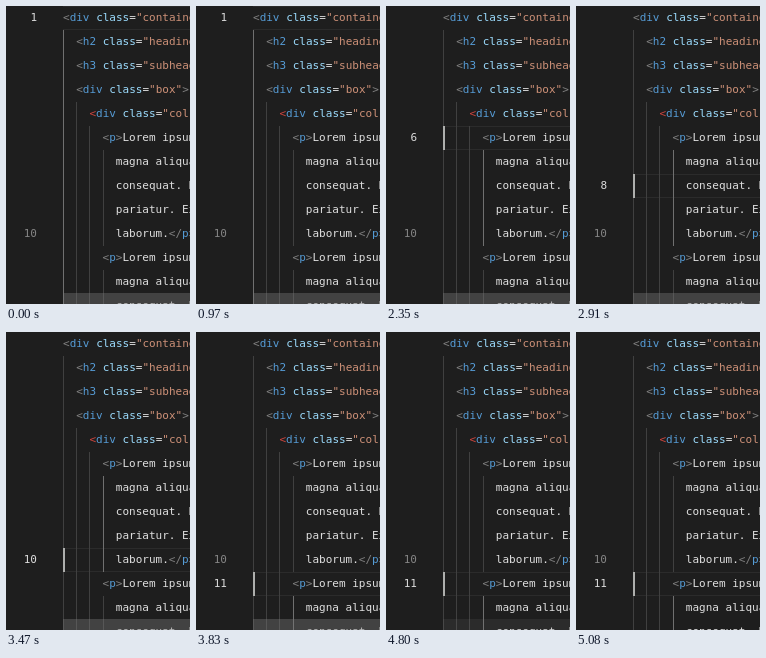
Recreate the animation shown at these times as an HTML page. Size 184 by 298 pixels, loop 5.13 s.

```html
<!DOCTYPE html>
<html lang="en">
<head>
<meta charset="utf-8">
<title>Code editor</title>
<style>
html, body { margin: 0; width: 100%; height: 100%; overflow: hidden; background: #1e1e1e; }
#editor {
  position: relative; width: 184px; height: 298px; overflow: hidden;
  background: #1e1e1e; color: #e0e0e0;
  font: 11px/24px "DejaVu Sans Mono", "Liberation Mono", monospace;
  font-variant-ligatures: none;
}
#editor div { position: absolute; box-sizing: border-box; white-space: pre; }
.number { left: 0; width: 31px; height: 24px; text-align: right; color: #858585; }
.number.active { color: #dcdcdc; }
.code { height: 24px; }
.guide { width: 1px; background: #404040; }
.guide.active { background: #707070; }
#current { left: 57px; width: 140px; height: 24px; border: 1px solid #2b2b2b; border-width: 1px 0; }
#cursor { left: 57px; width: 2px; height: 24px; background: #aeafad; }
#scrollbar { left: 57px; top: 287px; width: 127px; height: 11px; background: rgba(121, 121, 121, .4); }
.bracket { color: #808080; }
.mismatch { color: #d0453e; }
.tag { color: #569cd6; }
.attr { color: #9cdcfe; }
.string { color: #ce9178; }
</style>
</head>
<body>
<div id="editor"><div id="current"></div></div>
<script>
const LOOP = 5130, ROW = 24, LEFT = 57, INDENT = 13.2;
const editor = document.getElementById('editor');
const current = document.getElementById('current');

function add(className, top, text = '') {
  const el = document.createElement('div');
  el.className = className;
  el.style.top = top + 'px';
  el.innerHTML = text;
  return editor.appendChild(el);
}

const span = (kind, text) => `<span class="${kind}">${text}</span>`;
const open = (tag, bracket = 'bracket') => span(bracket, '&lt;') + span('tag', tag);
const close = span('bracket', '&gt;');
const element = (tag, name, bracket) =>
  open(tag, bracket) + ' ' + span('attr', 'class') + '=' + span('string', `"${name}"`) + close;
const paragraph = open('p') + close + 'Lorem ipsum dolor';

// Each entry is [indent level, markup].
const lines = [
  [0, element('div', 'container')],
  [1, element('h2', 'heading')],
  [1, element('h3', 'subheading')],
  [1, element('div', 'box')],
  [2, element('div', 'col', 'mismatch')],
  [3, paragraph],
  [4, 'magna aliqua. Ut'],
  [4, 'consequat. Duis'],
  [4, 'pariatur. Excepteur'],
  [4, 'laborum.' + span('bracket', '&lt;/') + span('tag', 'p') + close],
  [3, paragraph],
  [4, 'magna aliqua. Ut'],
  [4, 'consequat. Duis']
];

// Each entry is [indent level, first row, end row, active from line, active to line].
const guides = [
  [0, 1, 13, 1, 3], [1, 4, 13, 4, 4], [2, 5, 13, 5, 5], [3, 6, 10, 6, 10], [3, 11, 13, 11, 11]
].map(([level, first, end, from, to]) => {
  const el = add('guide', first * ROW);
  el.style.left = Math.round(LEFT + level * INDENT) + 'px';
  el.style.height = (end - first) * ROW + 'px';
  return { el, from, to };
});

const numbers = lines.map(([level, markup], i) => {
  add('code', i * ROW, markup).style.left = LEFT + level * INDENT + 'px';
  return add('number', i * ROW, i + 1);
});

const cursor = add('', 0);
cursor.id = 'cursor';
const scrollbar = add('', 287);
scrollbar.id = 'scrollbar';

const moves = [1200, 1480, 1790, 2070, 2350, 2630, 2910, 3190, 3470, 3830];
const hidden = [[0, 510], [970, 1200], [4290, 4800]];

function draw() {
  const t = performance.now() % LOOP;
  const line = 1 + moves.filter(time => t >= time).length;
  const top = (line - 1) * ROW + 'px';
  current.style.top = cursor.style.top = top;
  cursor.style.opacity = hidden.some(([from, to]) => t >= from && t < to) ? 0 : 1;
  scrollbar.style.opacity = Math.min(1, Math.max(0, (5080 - t) / 790));
  numbers.forEach((el, i) => {
    el.classList.toggle('active', i + 1 === line);
    el.style.opacity = i + 1 === line || i === 9 ? 1 : 0;
  });
  for (const { el, from, to } of guides) el.classList.toggle('active', line >= from && line <= to);
  requestAnimationFrame(draw);
}
draw();
</script>
</body>
</html>
```
